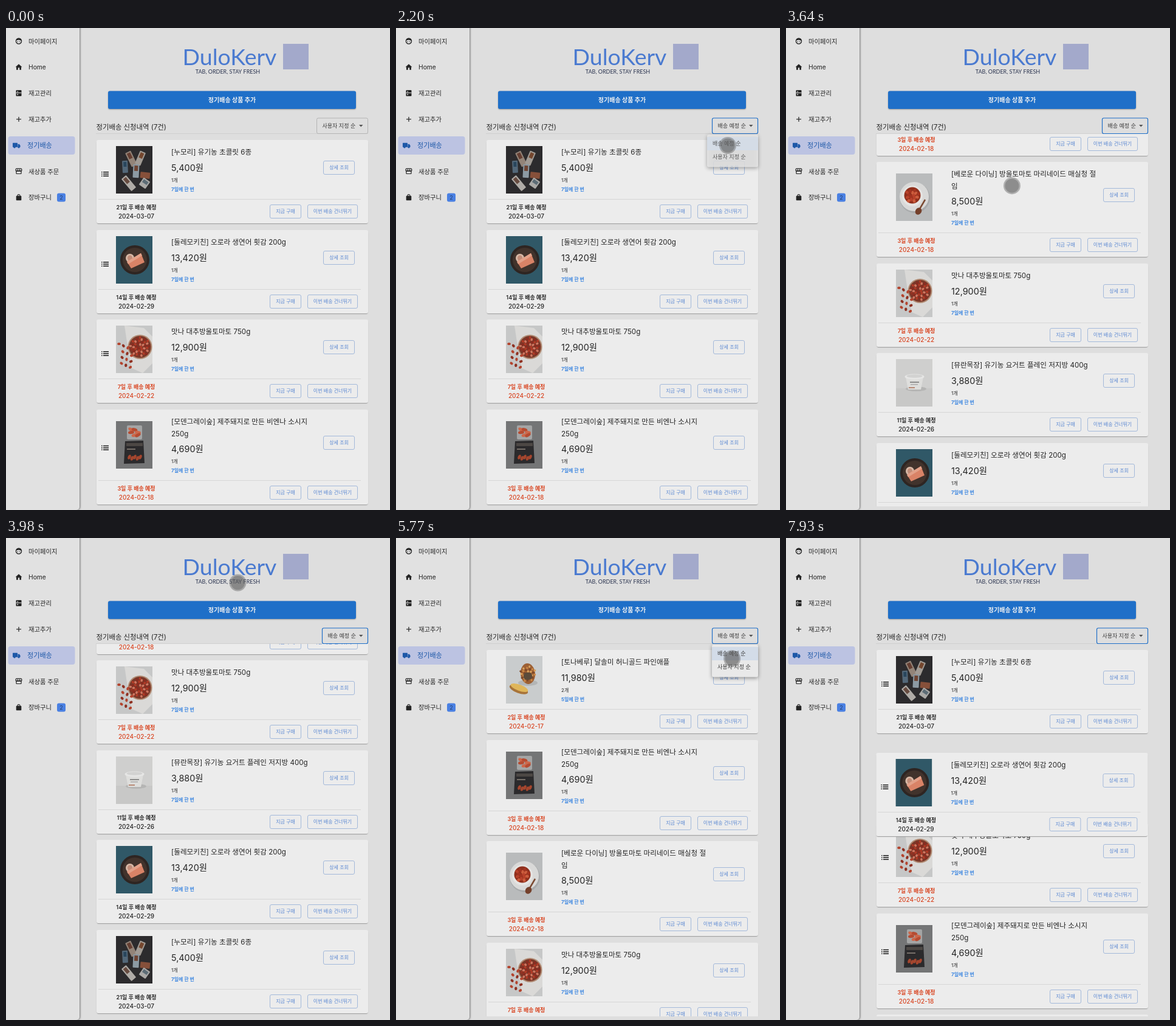
Write an HTML page with a canvas that moves like this. It is 632x792 px and loops after 8 s.

```html
<!DOCTYPE html>
<html lang="ko">
<head>
<meta charset="utf-8">
<style>
html, body { margin: 0; width: 100%; height: 100%; overflow: hidden; background: #dedede; }
canvas { display: block; }
</style>
</head>
<body>
<canvas id="stage" width="632" height="792"></canvas>
<script>
const g = document.getElementById('stage').getContext('2d');
const LOOP = 8000, MAX_SCROLL = 463.5;
const SANS = 'Inter, "Noto Sans CJK KR", "Noto Sans CJK JP", sans-serif';
const INK = '#242424', BLUE = '#1f6fc8', RED = '#d8431f', CARD = '#ececec';

const clamp = v => Math.max(0, Math.min(1, v));
const ramp = (t, a, b) => clamp((t - a) / (b - a));

function text(s, x, y, size, color = INK, weight = 400, align = 'left', family = SANS) {
  g.font = `${weight} ${size}px ${family}`;
  g.fillStyle = color;
  g.textAlign = align;
  g.fillText(s, x, y + size * 0.365);
}
function box(x, y, w, h, r, fill, stroke, lw = 1) {
  g.beginPath();
  g.roundRect(x, y, w, h, r);
  if (fill) { g.fillStyle = fill; g.fill(); }
  if (stroke) { g.strokeStyle = stroke; g.lineWidth = lw; g.stroke(); }
}
function raised(x, y, w, h, r, fill, shadow, blur, dx, dy) {
  g.save();
  g.shadowColor = shadow;
  g.shadowBlur = blur;
  g.shadowOffsetX = dx;
  g.shadowOffsetY = dy;
  box(x, y, w, h, r, fill);
  g.restore();
}
function oval(x, y, rx, ry, fill, rot = 0) {
  g.beginPath();
  g.ellipse(x, y, rx, ry, rot, 0, 7);
  g.fillStyle = fill;
  g.fill();
}
function poly(fill, ...p) {
  g.beginPath();
  for (let i = 0; i < p.length; i += 2) g.lineTo(p[i], p[i + 1]);
  g.closePath();
  g.fillStyle = fill;
  g.fill();
}
function line(x1, y1, x2, y2, color, lw = 1) {
  g.beginPath();
  g.moveTo(x1, y1);
  g.lineTo(x2, y2);
  g.strokeStyle = color;
  g.lineWidth = lw;
  g.stroke();
}
function tilted(x, y, w, h, rot, fill, label) {
  g.save();
  g.translate(x, y);
  g.rotate(rot);
  box(-w / 2, -h / 2, w, h, 1, fill);
  if (label) box(-w / 2 + 2, -h / 2 + 2, w - 4, h * 0.4, 0, label);
  g.restore();
}
function cluster(x, y, r, n, size, colors) {
  for (let i = 0; i < n; i++) {
    const d = r * Math.sqrt((i + 0.5) / n), a = i * 2.4;
    oval(x + d * Math.cos(a), y + d * Math.sin(a), size, size * 0.8, colors[i % colors.length], a);
  }
}

// Thumbnails, 60 x 78 each
const thumbs = {
  choc() {
    box(0, 0, 60, 78, 0, '#2c2b2d');
    tilted(25, 21, 10, 25, -0.45, '#938478', '#663f32');
    tilted(40, 20, 10, 23, 0.4, '#a19b94', '#75472f');
    tilted(15, 34, 9, 20, -0.05, '#536879', '#29465d');
    tilted(33, 41, 10, 22, 0.05, '#8c9aa3', '#6f4432');
    tilted(21, 61, 10, 26, -0.7, '#b0aca7', '#664b40');
    tilted(48, 48, 16, 10, 0.1, '#86503a');
    tilted(47, 61, 13, 14, 0.6, '#aaa9a7', '#5c6c76');
  },
  salmon() {
    box(0, 0, 60, 78, 0, '#305867');
    oval(31, 39, 24, 24, '#2e2522');
    oval(31, 39, 20, 20, '#41332c');
    oval(23, 36, 7, 7, '#d6b8a6');
    oval(23, 36, 4, 4.5, '#c08c78');
    poly('#d98367', 18, 42, 41, 28, 47, 43, 25, 53);
    poly('#e2a189', 18, 42, 41, 28, 43, 32, 20, 46);
  },
  tomato() {
    box(0, 0, 60, 78, 0, '#c6c7c7');
    poly('#dad9d7', 14, 0, 46, 4, 60, 18, 60, 62, 44, 78, 26, 70, 20, 40);
    oval(39.5, 35, 20, 20, '#b08a72');
    oval(39.5, 35, 18, 18, '#7a3829');
    cluster(39.5, 35, 16, 40, 2.3, ['#b23a26', '#8c2a1f', '#cf7660']);
    for (let i = 0; i < 13; i++) {
      oval(5 + (i * 7.3) % 23, 30 + i * 3.2, 2.8, 2.1, i % 2 ? '#8f3122' : '#b4442e', i);
    }
  },
  sausage() {
    box(0, 0, 60, 78, 0, '#747576');
    box(18, 7, 25, 23, 2, '#a4a5a5');
    for (let i = 0; i < 6; i++) {
      oval(25 + (i % 3) * 5.5, 14 + (i >> 1) * 4.5, 5, 2.6, i % 2 ? '#b64b31' : '#cd674a', 0.5 - i * 0.2);
    }
    poly('#2b2a2c', 15, 33, 45, 32, 47, 69, 13, 70);
    box(17, 36, 27, 5, 0, '#4c4744');
    box(18, 45, 14, 2, 0, '#77706a');
    for (let i = 0; i < 5; i++) oval(22 + i * 4.5, 59 + (i % 2) * 2, 2.4, 4, '#a5462e', 0.4);
  },
  soup() {
    box(0, 0, 60, 78, 0, '#b9bbbc');
    oval(31, 40, 25, 25, '#a9abac');
    oval(30, 38, 24, 24, '#d9d9d8');
    oval(27, 37, 17, 17, '#e6e5e3');
    oval(27, 36, 13.5, 13.5, '#8f301d');
    cluster(27, 36, 11, 15, 3, ['#b8412a', '#a33320', '#cc5c3c']);
    line(38, 60, 48, 43, '#7b4a32', 2.5);
    oval(37, 62, 5, 6, '#74402b', 0.6);
  },
  yogurt() {
    box(0, 0, 60, 78, 0, '#cfcfce');
    box(0, 48, 60, 30, 0, '#c8c8c7');
    oval(33, 49, 17, 4, '#b5b5b4');
    poly('#dededc', 16, 30, 45, 30, 41, 50, 20, 50);
    oval(30.5, 29, 16, 4.5, '#e6e6e5');
    oval(30.5, 28, 13, 2.8, '#d2d2d1');
    box(23, 37, 15, 2, 0, '#8d8d8c');
    box(24, 41, 12, 1.5, 0, '#aaa');
    box(21, 46, 10, 2, 0, '#b98a76');
  },
  pine() {
    box(0, 0, 60, 78, 0, '#c9cccd');
    oval(36, 44, 16, 5, '#b3b5b5');
    oval(36, 29, 12, 17, '#9d6034', -0.1);
    cluster(36, 29, 13, 28, 2, ['#c98745', '#7d4929', '#d9a25d']);
    box(29, 27, 14, 12, 5, '#5b4b3a');
    g.save();
    g.translate(22, 52);
    g.rotate(0.35);
    oval(0, 3, 16, 6, '#a8743a');
    oval(0, 0, 15, 5, '#dfb65a');
    g.restore();
  }
};

const product = (pic, title, price, days, date, extra, count = 1, every = 7) =>
  ({ pic, title, price, days, date, extra, count, every });
const choc = product('choc', '[누모리] 유기농 초콜릿 6종', '5,400', 21, '03-07');
const salmon = product('salmon', '[둘레모키친] 오로라 생연어 횟감 200g', '13,420', 14, '02-29');
const tomato = product('tomato', '맛나 대추방울토마토 750g', '12,900', 7, '02-22');
const sausage = product('sausage', '[모덴그레이숲] 제주돼지로 만든 비엔나 소시지', '4,690', 3, '02-18', '250g');
const soup = product('soup', '[베로운 다이닝] 방울토마토 마리네이드 매실청 절', '8,500', 3, '02-18', '임');
const yogurt = product('yogurt', '[뮤란목장] 유기농 요거트 플레인 저지방 400g', '3,880', 11, '02-26');
const pine = product('pine', '[토나베루] 달솔미 허니골드 파인애플', '11,980', 2, '02-17', '', 2, 5);
const custom = [choc, salmon, tomato, sausage, yogurt, soup, pine];
const byDate = [pine, sausage, soup, tomato, yogurt, salmon, choc];

function button(x, y, w, label) {
  box(x + 0.5, y - 11, w - 1, 22, 2.5, null, '#a3b9da');
  text(label, x + w / 2, y, 8, '#5b88d2', 400, 'center');
}

function card(p, x, y, handle) {
  const tall = p.extra ? 19 : 0, half = Math.floor(tall / 2), h = 137 + tall;
  g.save();
  g.translate(x, Math.round(y));
  raised(149.5, 2, 446, h - 1, 3, '#a2a2a2', 'rgba(0,0,0,.15)', 2, 0, 0);
  box(149, 0, 447, h, 3, CARD);
  if (handle) {
    for (let i = 0; i < 3; i++) {
      const ly = 52 + tall * 0.36 + i * 3.2;
      box(157, ly, 1.6, 1.6, 0, INK);
      box(160, ly, 9, 1.6, 0, INK);
    }
  }
  g.save();
  g.translate(181, 10 + half);
  g.beginPath();
  g.rect(0, 0, 60, 78);
  g.clip();
  thumbs[p.pic]();
  g.restore();

  text(p.title, 272, 20, 11.6);
  if (p.extra) text(p.extra, 272, 40, 11.6);
  text(p.price + '원', 272, 45.5 + tall, 14.4);
  text(p.count + '개', 272, 66.5 + tall, 8);
  text(p.every + '일에 한 번', 272, 81.5 + tall, 8, '#3c86e0', 700);
  button(522, 45.5 + half, 52, '상세 조회');
  line(152, 97.5 + tall, 584, 97.5 + tall, '#d6d6d6');
  const due = p.days <= 7 ? RED : INK;
  text(p.days + '일 후 배송 예정', 214.5, 110.5 + tall, 9, due, 600, 'center');
  text('2024-' + p.date, 214.5, 125.5 + tall, 10, due, 500, 'center');
  button(434, 117.5 + tall, 52, '지금 구매');
  button(496, 117.5 + tall, 83, '이번 배송 건너뛰기');
  g.restore();
}

function list(items, scroll, handles, drag) {
  g.save();
  g.beginPath();
  g.rect(140, 174, 470, 612);
  g.clip();
  let y = 184 - scroll, lifted;
  items.forEach((p, i) => {
    if (drag && i === 1) lifted = y + 21 * drag;
    else card(p, 0, y - (i > 1 ? 10 * drag : 0), handles);
    y += p.extra ? 166.6 : 147.5;
  });
  if (drag) card(items[1], -0.6 * drag, lifted, handles);
  g.restore();
}

const icons = [
  () => { g.beginPath(); g.arc(0, 0, 4.6, 0, 7); g.strokeStyle = INK; g.lineWidth = 1.3; g.stroke();
    poly(INK, -4.5, -1, -2, -4.5, 3, -4, 4.5, -0.5, 0, -2);
    oval(-1.7, 1, 0.7, 0.7, INK); oval(1.7, 1, 0.7, 0.7, INK); },
  () => { poly(INK, 0, -5, 5.5, 0, 4, 0, 4, 4.5, 1.2, 4.5, 1.2, 1, -1.2, 1, -1.2, 4.5, -4, 4.5, -4, 0, -5.5, 0); },
  () => { box(-4.5, -5, 9, 10, 1, INK); line(-4.5, -0.5, 4.5, -0.5, '#e1e1e1');
    box(-2.5, -3.5, 1.3, 2, 0, '#e1e1e1'); box(-2.5, 1, 1.3, 2.4, 0, '#e1e1e1'); },
  () => { line(-4, 0, 4, 0, INK, 1.2); line(0, -4, 0, 4, INK, 1.2); },
  () => { g.translate(-4, 0); box(-6, -4, 8, 7, 0.5, '#1d58a8');
    poly('#1d58a8', 2.5, -2, 4.8, -2, 6.5, 0.4, 6.5, 3, 2.5, 3);
    oval(-3, 3, 1.7, 1.7, '#1d58a8'); oval(4, 3, 1.7, 1.7, '#1d58a8'); },
  () => { box(-4, -1, 8, 5, 0.5, null, INK, 1.2); box(-4.8, -4.3, 9.6, 4, 1, null, INK, 1.2);
    line(-1.6, -4, -1.6, 0, INK); line(1.6, -4, 1.6, 0, INK); },
  () => { box(-4.3, -2.6, 8.6, 7.6, 1, INK); g.beginPath(); g.arc(0, -2.6, 2, Math.PI, 0);
    g.strokeStyle = INK; g.lineWidth = 1.2; g.stroke(); }
];
const pages = ['마이페이지', 'Home', '재고관리', '재고추가', '정기배송', '새상품 주문', '장바구니'];

function sidebar() {
  raised(-10, -10, 131, 802, 5, '#e1e1e1', 'rgba(0,0,0,.5)', 3, 1, 0);
  box(3.5, 178, 110, 30, 4, '#bcc3e2');
  pages.forEach((name, i) => {
    const y = 21.5 + i * 42.8, on = i === 4;
    g.save();
    g.translate(21, y);
    icons[i]();
    g.restore();
    text(name, on ? 35 : 37, y + 0.3, on ? 11.1 : 10.3, on ? '#1d58a8' : INK);
  });
  box(84, 271.5, 14, 14, 3, '#4a80e2');
  text('2', 91, 278.5, 9, '#26406f', 400, 'center');
}

function header() {
  text('DuloKerv', 368, 47, 37.5, '#4a7ad0', 400, 'center', 'Lato, sans-serif');
  text('TAB, ORDER, STAY FRESH', 365, 71.5, 9, '#2c3550', 400, 'center', 'Lato, sans-serif');
  box(456, 26, 42, 42, 0, '#a3a9cb');
  raised(168, 103.5, 408, 29.5, 3, BLUE, 'rgba(0,0,0,.3)', 2, 0, 1);
  text('정기배송 상품 추가', 372, 118, 10, '#f2f2f2', 700, 'center');
  text('정기배송 신청내역 (7건)', 148.5, 163, 11.4);
  line(148, 173.5, 596, 173.5, '#cfcfcf');
}

const sorts = ['배송 예정 순', '사용자 지정 순'];

function select(index, focused) {
  const x = index ? 511.5 : 520.5;
  box(x, 148, 595.5 - x, 25.5, 2.5, null, focused ? BLUE : '#b4b4b4', focused ? 1.2 : 1);
  text(sorts[index], x + 9, 160.5, 9, '#3a3a3a');
  poly('#555', 581, 159, 587.5, 159, 584.2, 162.5);
}

function menu(x, index, alpha) {
  if (alpha <= 0) return;
  g.save();
  g.globalAlpha = alpha;
  raised(x, 175, 596 - x, 53.5, 3, '#e9e9e9', 'rgba(0,0,0,.4)', 6, 0, 2);
  box(x, 179 + index * 22, 596 - x, 22, 0, '#d3dce8');
  sorts.forEach((s, i) => text(s, x + 9, 190 + i * 22, 9, '#3a3a3a'));
  g.restore();
}

// Pointer path: time, x, y
const path = [
  [530, 606, 330], [800, 590, 235], [1150, 556, 162], [1450, 556, 162], [1800, 546, 193],
  [2260, 546, 193], [2900, 366, 537], [3080, 366, 537], [3290, 362, 451], [3980, 381.5, 74],
  [4110, 383, 10], [4740, 348, 507], [4880, 348, 507], [5350, 556, 160], [5580, 556, 160],
  [5780, 553, 200], [5980, 553, 200], [6180, 560, 213], [6320, 560, 213]
];

function pointer(t) {
  const i = path.findIndex(p => p[0] > t);
  if (i < 1) return null;
  const [a, b] = [path[i - 1], path[i]], k = ramp(t, a[0], b[0]);
  return { x: a[1] + (b[1] - a[1]) * k, y: a[2] + (b[2] - a[2]) * k };
}

function scrollAt(t, p) {
  if (t < 3080 || t > 4740) return 0;
  return t < 4110 ? Math.min(MAX_SCROLL, 537 - p.y) : Math.max(0, MAX_SCROLL + 10 - p.y);
}

function draw(t) {
  const p = pointer(t);
  const index = t >= 2150 && t < 6320 ? 0 : 1;
  const sorted = t >= 2260 && t < 6320;
  g.fillStyle = '#dedede';
  g.fillRect(0, 0, 632, 792);
  sidebar();
  header();
  list(sorted ? byDate : custom, scrollAt(t, p), index === 1, ramp(t, 7700, 7930));
  select(index, t >= 1300);
  menu(512, index, ramp(t, 1330, 1530) - ramp(t, 2170, 2350));
  menu(520, index, ramp(t, 5520, 5720) - ramp(t, 6270, 6400));
  if (p) {
    oval(p.x, p.y, 14, 14, 'rgba(90,90,90,.42)');
    oval(p.x, p.y, 11.5, 11.5, 'rgba(90,90,90,.4)');
  }
}

function frame() {
  draw(performance.now() % LOOP);
  requestAnimationFrame(frame);
}
frame();
</script>
</body>
</html>
```
